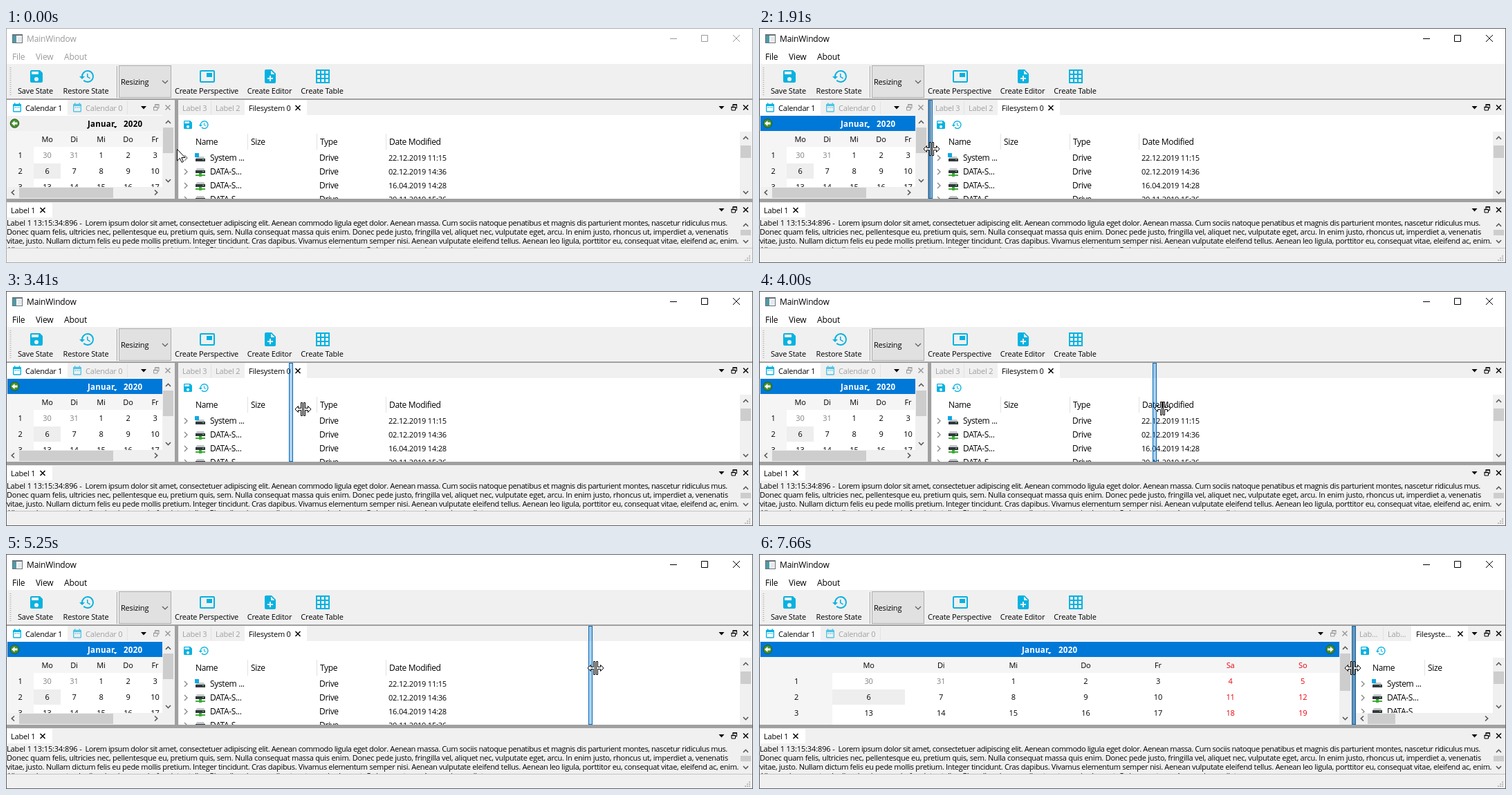
Animation, 1080 px wide and 340 px high, one loop 8000 ms. Source, as an HTML page:

```html
<!DOCTYPE html>
<html lang="en">
<head>
<meta charset="utf-8">
<title>MainWindow</title>
<style>
html, body { margin: 0; width: 100%; height: 100%; overflow: hidden; background: #fff; }
#stage { display: block; width: 1080px; height: 340px; font-family: "Open Sans", "Noto Sans", sans-serif; }
text { white-space: pre; }
.ui { font-size: 11px; letter-spacing: -.18px; }
.num { font-size: 11px; letter-spacing: -.1px; }
.sys { font-size: 12px; letter-spacing: -.15px; }
.list { font-size: 12px; letter-spacing: -.35px; }
.date { font-size: 11px; letter-spacing: -.2px; }
.body { font-size: 11px; }
.bold { font-size: 11.5px; font-weight: 700; letter-spacing: .25px; }
.mid { text-anchor: middle; }
.line { fill: none; stroke: currentColor; }
.chrome { color: #000; fill: currentColor; }
.idle .chrome { color: #999; }
.frame { fill: none; stroke: #606060; }
.idle .frame { stroke: #aaa; }
.bar { fill: #0078d7; }
.on-bar { fill: #fff; }
.idle .bar { fill: #f0f0f0; }
.idle .on-bar { fill: #000; }
.wide .narrow-only, .narrow .wide-only { display: none; }
.wide .slide { transform: translateX(613px); }
.icon { fill: #06b2e1; fill-rule: evenodd; }
.band { fill: rgba(0, 120, 215, .33); stroke: #0668b4; }
.cursor { fill: #fff; stroke: #000; }
</style>
</head>
<body>
<svg id="stage" class="narrow idle" viewBox="0 0 1080 340"></svg>
<script>
const GREY = '#a0a0a0', FACE = '#f0f0f0';

const rect = (x, y, w, h, fill, cls = '') =>
  `<rect x="${x}" y="${y}" width="${w}" height="${h}" class="${cls}"${fill ? ` fill="${fill}"` : ''}/>`;
const text = (x, y, s, cls = 'ui', fill = '') =>
  `<text x="${x}" y="${y}" class="${cls}"${fill ? ` fill="${fill}"` : ''}>${s}</text>`;
const line = (d, color, width = 1) =>
  `<path d="${d}" class="line" stroke-width="${width}"${color ? ` style="color:${color}"` : ''}/>`;
const group = (cls, body) => `<g class="${cls}">${body}</g>`;
const clip = (x, y, w, h, body) =>
  `<svg x="${x}" y="${y}" width="${w}" height="${h}" viewBox="${x} ${y} ${w} ${h}">${body}</svg>`;

const shapes = {
  save: 'M17 3H5a2 2 0 0 0-2 2v14a2 2 0 0 0 2 2h14a2 2 0 0 0 2-2V7zM12 19a3 3 0 1 1 0-6 3 3 0 0 1 0 6zM15 9H5V5h10z',
  history: 'M13 3a9 9 0 0 0-9 9H1l4 4 4-4H6a7 7 0 1 1 2 5l-1.4 1.4A9 9 0 1 0 13 3zM12 8v5l4.3 2.5.7-1.2-3.5-2.1V8z',
  pane: 'M3 3h18a2 2 0 0 1 2 2v14a2 2 0 0 1-2 2H3a2 2 0 0 1-2-2V5a2 2 0 0 1 2-2zM3 5v14h18V5zM11 7h8v6h-8z',
  file: 'M14 2H6a2 2 0 0 0-2 2v16a2 2 0 0 0 2 2h12a2 2 0 0 0 2-2V8zM16 16h-3v3h-2v-3H8v-2h3v-3h2v3h3zM13 9V3.5L18.5 9z',
  date: 'M9 11H7v2h2zM13 11h-2v2h2zM17 11h-2v2h2zM19 4h-1V2h-2v2H8V2H6v2H5a2 2 0 0 0-2 2v14a2 2 0 0 0 2 2h14a2 2 0 0 0 2-2V6a2 2 0 0 0-2-2zM19 20H5V9h14z'
};
const icon = (name, x, y, scale = 1, alpha = 1) =>
  `<path class="icon" opacity="${alpha}" transform="translate(${x} ${y}) scale(${scale})" d="${shapes[name]}"/>`;

const close = (x, y, color = '#000') =>
  line(`M${x - 3.5} ${y - 3.5}l7 7m0-7l-7 7`, color, 1.5);
const undock = (x, y, color = '#000') =>
  line(`M${x - 1.5} ${y - 1}v-3h5.5v5h-2M${x - 3.5} ${y - .5}h5.5v4.5h-5.5z`, color) +
  line(`M${x - 2} ${y - 4}h6.5M${x - 4} ${y - .5}h6.5`, color, 1.6);
const drop = (x, y) => `<path d="M${x - 4} ${y - 2}h8l-4 4.5z"/>`;
const dockButtons = (x, y, color) => drop(x, y) + undock(x + 18, y, color) + close(x + 35, y, color);

const arrow = (x, y, turn) =>
  `<path class="line" style="color:#555" stroke-width="1.6" transform="translate(${x} ${y}) rotate(${turn})" d="M-3.5 2L0-1.7 3.5 2"/>`;
const vBar = (x, top, bottom, y, h) =>
  rect(x, top, 17, bottom - top, FACE) + rect(x + 1, y, 15, h, '#cdcdcd') +
  arrow(x + 8.5, top + 9, 0) + arrow(x + 8.5, bottom - 9, 180);
const hBar = (left, right, x, w) =>
  rect(left, 230, right - left, 17, FACE) + rect(x, 231, w, 15, '#cdcdcd') +
  arrow(left + 9, 238, -90) + arrow(right - 9, 238, 90);

function titleAndTools() {
  const appIcon = rect(9, 9, 15, 13, '#6a7076') + rect(10, 11, 13, 10, '#f4f6f8') +
    rect(10, 11, 5, 10, '#4f9aa8') + rect(17, 13, 5, 7, '#e4e8ec');
  const chrome = text(30, 20, 'MainWindow', 'sys') + text(9, 46, 'File', 'sys') +
    text(43, 46, 'View', 'sys') + text(84, 46, 'About', 'sys') +
    line('M960 15.5h10M1005.5 10.5h9v9h-9zM1051 10l10 10m0-10l-10 10');
  const labels = [[42.5, 'Save State'], [115.5, 'Restore State'], [290, 'Create Perspective'],
    [381, 'Create Editor'], [457, 'Create Table']];
  return appIcon + group('chrome', chrome) + rect(1, 52, 1078, 50, FACE) +
    `<path d="M6.5 57v42" stroke="#b0b0b0" stroke-width="2" stroke-dasharray="1 2"/>` +
    rect(160, 55, 1, 46, GREY) + rect(161, 55, 1, 46, '#fff') +
    `<rect x="163.5" y="54.5" width="75" height="46" fill="#e1e1e1" stroke="#adadad"/>` +
    text(166, 82, 'Resizing') + line('M226 76l4 4 4-4', '#555', 1.1) +
    icon('save', 32, 58) + icon('history', 105, 58) + icon('pane', 279, 58) + icon('file', 370, 58) +
    line('M449 61h18v18h-18zM455 61v18M461 61v18M449 67h18M449 73h18', '#06b2e1', 2) +
    labels.map(([x, s]) => text(x, 95, s, 'ui mid')).join('');
}

const navArrow = (x, flip) =>
  `<g transform="translate(${x} 138) scale(${flip} 1)"><circle r="6.3" fill="#43902c" stroke="#2c5a22"/>` +
  `<path d="M-4.5 0L0-4v2.5h4v3H0V4z" fill="#fff"/></g>`;

function calendar(right, bottom, colW, first, cols, title, year) {
  const days = ['Mo', 'Di', 'Mi', 'Do', 'Fr', 'Sa', 'So'];
  const x = i => first + colW * i;
  const edge = x(.5);
  let out = rect(2, 126, right - 2, bottom - 126, '#fff') + rect(2, 149, right - 2, 23, '#f5f5f5') +
    rect(2, 149, Math.round(edge) - 2, bottom - 149, '#f5f5f5') +
    rect(2, 127, right - 2, 22, '', 'bar') + navArrow(12.5, 1) +
    text(title, 143, 'Januar', 'bold on-bar') + text(year, 143, '2020', 'bold on-bar') +
    `<path class="on-bar" d="M${title + 37.5} 142h5l-2.5 3z"/>` +
    rect(Math.round(edge), 196, Math.round(colW), 22, '#eee');
  for (let c = 1; c <= cols; c++) {
    const red = c > 5 ? '#e8000d' : '';
    out += text(x(c), 165, days[c - 1], 'ui mid', red);
    for (let r = 0; r < 3; r++) {
      const n = r * 7 + c - 2, day = n < 1 ? n + 31 : n;
      out += text(x(c), 188 + 23 * r, day, 'num mid', n < 1 ? '#808080' : red);
    }
  }
  for (let r = 0; r < 3; r++) out += text(x(0), 188 + 23 * r, r + 1, 'num mid');
  return clip(2, 126, right - 2, bottom - 126, out);
}

function leftDock() {
  const tabs = rect(2, 104, 87, 22, '#fff') + rect(175, 106, 1, 19, '#e2e2e2') +
    icon('date', 8, 107, .667) + text(28, 120, 'Calendar 1') +
    icon('date', 95, 107, .667, .7) + text(115, 120, 'Calendar 0', 'ui', GREY);
  const narrow = rect(1, 104, 243, 143, FACE) + calendar(226, 230, 39, 20.5, 5, 118, 170) +
    vBar(226, 127, 230, 144, 37) + hBar(1, 226, 19, 136);
  const wide = rect(1, 104, 856, 143, FACE) + calendar(839, 247, 104.6, 54, 7, 380, 433) +
    navArrow(826, -1) + vBar(839, 127, 247, 144, 54);
  return group('narrow-only', narrow) + group('wide-only', wide) + tabs +
    group('slide', dockButtons(199, 115, '#999'));
}

function drive(y, system) {
  const body = `<path d="M276 ${y}h10l2 3.5h-14z" fill="#c4c8cc"/>` + rect(274, y + 3, 14, 4, '#33383d') +
    rect(284, y + 4, 2, 1, '#5fe05f');
  return system ? body + rect(273, y - 5, 6, 6, '#10a9e4')
    : body + rect(274, y + 9, 14, 2, '#46a83c') + rect(279, y + 7, 4, 5, '#35b02f');
}

function files() {
  const rows = [['System ...', '22.12.2019 11:15'], ['DATA-S...', '02.12.2019 14:36'],
    ['DATA-S...', '16.04.2019 14:28'], ['DATA-S...', '20.11.2019 15:36']];
  const heads = ['Name', 'Size', 'Type', 'Date Modified'];
  return icon('save', 255, 132, .667) + icon('history', 278, 132, .667) +
    heads.map((s, i) => text(254 + 100 * i + (i ? 0 : 20), 169, s, 'list') +
      (i ? rect(249 + 100 * i, 153, 1, 23, '#e2e2e2') : '')).join('') +
    rows.map(([name, date], i) => {
      const y = 188 + 20 * i;
      return line(`M258 ${y - 4}l4 4-4 4`, '#888', 1.4) + drive(y - (i ? 5 : 2), !i) +
        text(295, y + 4, name, 'list') + text(453, y + 4, 'Drive', 'list') + text(553, y + 4, date, 'date');
    }).join('');
}

function rightDock() {
  const listing = files();
  const narrow = rect(249, 104, 830, 143, FACE) + rect(250, 126, 828, 121, '#fff') +
    rect(345, 104, 90, 22, '#fff') + rect(296, 106, 1, 19, '#e2e2e2') +
    text(255, 120, 'Label 3', 'ui', GREY) + text(303, 120, 'Label 2', 'ui', GREY) +
    text(351, 120, 'Filesystem 0') + close(422, 115.5) +
    clip(250, 126, 811, 121, listing) + vBar(1061, 150, 247, 170, 18);
  const wide = rect(862, 104, 217, 143, FACE) + rect(863, 126, 215, 121, '#fff') +
    rect(943, 104, 82, 22, '#fff') + rect(902, 106, 1, 19, '#e2e2e2') +
    text(868, 120, 'Lab...', 'ui', GREY) + text(909, 120, 'Lab...', 'ui', GREY) +
    text(950, 120, 'Filesyste...') + close(1014, 115.5) +
    clip(863, 126, 198, 104, `<g transform="translate(613 0)">${listing}</g>`) +
    rect(1061, 230, 17, 17, FACE) + vBar(1061, 150, 230, 170, 18) + hBar(863, 1061, 880, 40);
  return group('narrow-only', narrow) + group('wide-only', wide) + dockButtons(1034.5, 115);
}

function bottomDock() {
  const para = [
    [1, 286, -.12, 'Label 1 13:15:34:896 - '],
    [114.5, 286, -.4, 'Lorem ipsum dolor sit amet, consectetuer adipiscing elit. Aenean commodo ligula eget dolor. Aenean massa. Cum sociis natoque penatibus et magnis dis parturient montes, nascetur ridiculus mus.'],
    [1, 299, -.25, 'Donec quam felis, ultricies nec, pellentesque eu, pretium quis, sem. Nulla consequat massa quis enim. Donec pede justo, fringilla vel, aliquet nec, vulputate eget, arcu. In enim justo, rhoncus ut, imperdiet a, venenatis'],
    [1, 312, -.315, 'vitae, justo. Nullam dictum felis eu pede mollis pretium. Integer tincidunt. Cras dapibus. Vivamus elementum semper nisi. Aenean vulputate eleifend tellus. Aenean leo ligula, porttitor eu, consequat vitae, eleifend ac, enim.'],
    [1, 325, -.315, 'Aliquam lorem ante, dapibus in, viverra quis, feugiat a, tellus. Phasellus viverra nulla ut metus varius laoreet. Quisque rutrum. Aenean imperdiet.']
  ];
  let grip = '';
  for (let r = 0; r < 3; r++)
    for (let c = 0; c <= r; c++) grip += rect(1074 - 3 * c, 329 + 3 * r, 2, 2, '#bdbdbd');
  return rect(1, 252, 1078, 87, FACE) + rect(2, 253, 65, 21, '#fff') +
    text(7, 268, 'Label 1') + close(53, 263.5) + dockButtons(1034.5, 263) +
    clip(1, 275, 1061, 43, para.map(([x, y, gap, s]) =>
      `<text x="${x}" y="${y}" class="body" letter-spacing="${gap}">${s}</text>`).join('')) +
    vBar(1061, 276, 318, 292, 8) + rect(1, 318, 1078, 1, '#c4c4c4') + grip;
}

const stage = document.getElementById('stage');
stage.innerHTML = rect(0, 0, 1080, 340, '#fff') + titleAndTools() +
  rect(1, 102, 1078, 150, GREY) + leftDock() + rightDock() + bottomDock() +
  '<rect class="frame" x=".5" y=".5" width="1079" height="339"/>' +
  '<rect id="band" class="band" y="104.5" width="5" height="142"/>' +
  '<path id="pointer" class="cursor" transform="translate(247.5 175.5)" d="M0 0v16.5l3.8-3.6 2.8 6 2.4-1.1-2.7-5.8h5.2z"/>' +
  '<path id="split" class="cursor" d="M-3-9.5h2v19h-2v-8h-4V4.5L-11.5 0l4.5-4.5v3h4zM1-9.5h2v8h4v-3L11.5 0 7 4.5v-3H3v8H1z"/>';
const band = document.getElementById('band');
const pointer = document.getElementById('pointer');
const split = document.getElementById('split');

// tick, cursor x, cursor y, band x
const drag = [
  [13, 247, 176, 244], [19, 247, 176, 244], [23, 249, 175, 245], [26, 255, 177, 250],
  [29, 279, 179, 268], [30, 292, 179, 280], [39, 398, 173, 387], [41, 429, 171, 409],
  [49, 605, 170, 592], [56, 775, 168, 757], [59, 832, 166, 810], [62, 850, 165, 838],
  [67, 859, 164, 857], [77, 859, 164, 857], [81, 858, 173, 857], [91, 858, 173, 857],
  [92, 858, 165, 857], [96, 858, 165, 857]
];

function poseAt(tick) {
  const i = Math.max(1, drag.findIndex(key => key[0] >= tick));
  const a = drag[i - 1], b = drag[i];
  const k = Math.max(0, (tick - a[0]) / (b[0] - a[0]));
  return a.map((v, n) => Math.round(v + (b[n] - v) * k));
}

function draw() {
  const tick = Math.floor((performance.now() % 8000 + 7) * 12 / 1000);
  const step = Math.min(tick, 95);
  const [, x, y, bandX] = poseAt(step);
  const active = step >= 13;
  stage.setAttribute('class', (step < 69 ? 'narrow' : 'wide') + (active ? '' : ' idle'));
  pointer.style.display = active ? 'none' : '';
  split.style.display = active ? '' : 'none';
  split.setAttribute('transform', `translate(${x + .5} ${y})`);
  band.style.display = (step >= 17 && step < 69) || step >= 92 ? '' : 'none';
  band.setAttribute('x', bandX + .5);
  requestAnimationFrame(draw);
}
draw();
</script>
</body>
</html>
```
